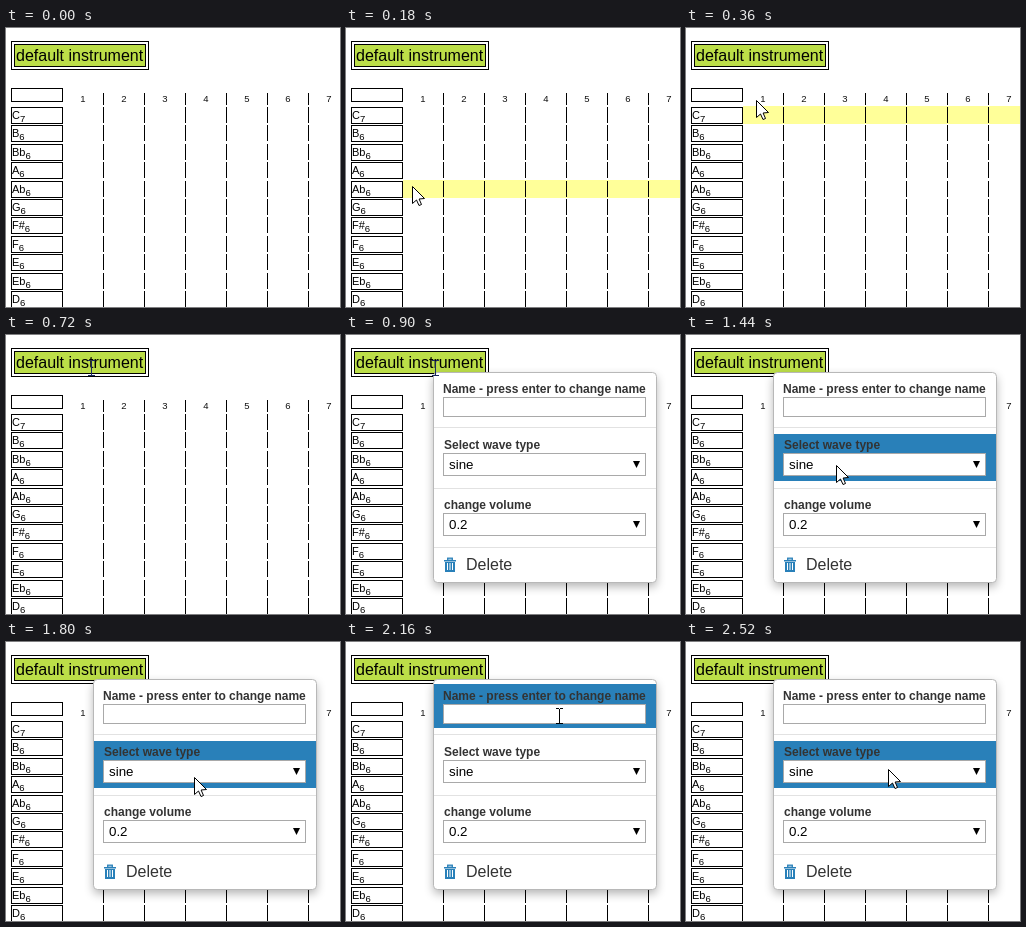
Write an HTML page with a canvas that moves like this. It is 334x279 px and loops after 2.7 s.

```html
<!DOCTYPE html>
<html lang="en">
<head>
<meta charset="utf-8">
<title>Instrument menu</title>
<style>
html, body { margin: 0; width: 100%; height: 100%; overflow: hidden; background: #fff; }
canvas { display: block; }
</style>
</head>
<body>
<canvas id="stage" width="334" height="279"></canvas>
<script>
const ctx = document.getElementById('stage').getContext('2d');
const FONT = '"Liberation Sans", Arial, sans-serif';
const BLUE = '#2980b9';
const STEP = 180;
const PITCH = 18.4;
const NOTES = ['C7', 'B6', 'Bb6', 'A6', 'Ab6', 'G6', 'F#6', 'F6', 'E6', 'Eb6', 'D6'];
const SECTIONS = { name: [42, 44], wave: [99, 47], volume: [160, 46] };

// One pose per step: pointer shape and place, hovered note row, open menu, hovered section
const POSES = [
  {},
  { arrow: [66, 158], row: 4 },
  { arrow: [70, 72], row: 0 },
  { beam: [79, 31] },
  { beam: [85, 33] },
  { beam: [89, 33], menu: true },
  { beam: [108, 70], menu: true, hover: 'name' },
  { beam: [130, 70], menu: true, hover: 'name' },
  { arrow: [150, 130], menu: true, hover: 'wave' },
  { arrow: [172, 203], menu: true, hover: 'volume' },
  { arrow: [188, 135], menu: true, hover: 'wave' },
  { beam: [203, 72], menu: true, hover: 'name' },
  { beam: [213, 74], menu: true, hover: 'name' },
  { arrow: [208, 116], menu: true, hover: 'wave' },
  { arrow: [202, 127], menu: true, hover: 'wave' }
];

function fill(color, x, y, w, h) {
  ctx.fillStyle = color;
  ctx.fillRect(x, y, w, h);
}

function frame(color, x, y, w, h) {
  ctx.strokeStyle = color;
  ctx.lineWidth = 1;
  ctx.strokeRect(x + .5, y + .5, w - 1, h - 1);
}

function text(str, x, y, size, color = '#000', weight = '', align = 'left') {
  ctx.font = `${weight} ${size}px ${FONT}`;
  ctx.textAlign = align;
  ctx.fillStyle = color;
  ctx.fillText(str, x, y);
}

function polygon(color, points) {
  ctx.beginPath();
  points.forEach(([x, y]) => ctx.lineTo(x, y));
  ctx.closePath();
  ctx.fillStyle = color;
  ctx.fill();
}

function drawGrid(row) {
  frame('#000', 5, 13, 138, 29);
  fill('#bcde48', 8, 16, 132, 23);
  frame('#000', 8, 16, 132, 23);
  text('default instrument', 10, 33, 16);

  frame('#000', 5, 60, 52, 14);
  if (row !== undefined) fill('#ffff99', 57, Math.round(78 + row * PITCH), 277, 18);
  for (let i = 0; i < 7; i++) {
    const x = 97 + i * 41;
    text(i + 1, x - 20, 74, 9.5, '#111', '', 'center');
    fill('#000', x, 65, 1, 12);
    NOTES.forEach((_, n) => fill('#000', x, Math.round(79 + n * PITCH), 1, 16));
  }
  NOTES.forEach((note, n) => {
    const y = Math.round(79 + n * PITCH);
    frame('#000', 5, y, 52, 17);
    const pitch = note.slice(0, -1);
    text(pitch, 6, y + 12, 11);
    text(note.slice(-1), 6 + ctx.measureText(pitch).width, y + 15, 9.5);
  });
}

function field(y, h, value) {
  fill('#fff', 97, y, 203, h);
  frame('#a9a9a9', 97, y, 203, h);
  if (!value) return;
  text(value, 103, y + 16, 13.33);
  polygon('#000', [[287, y + 8], [294, y + 8], [290.5, y + 15]]);
}

function drawTrash() {
  fill(BLUE, 98, 225, 12, 1.5);
  ctx.strokeStyle = BLUE;
  ctx.lineWidth = 1.3;
  ctx.strokeRect(101.7, 223.2, 4.6, 2);
  fill(BLUE, 99, 227, 10, 10);
  for (const x of [101, 103.5, 106]) fill('#fff', x, 228, 1, 7);
}

function drawMenu(hover) {
  ctx.save();
  ctx.shadowColor = 'rgba(0,0,0,.3)';
  ctx.shadowBlur = 10;
  ctx.shadowOffsetY = 4;
  ctx.beginPath();
  ctx.roundRect(87.5, 37.5, 223, 210, 4);
  ctx.fillStyle = '#fff';
  ctx.fill();
  ctx.restore();
  ctx.strokeStyle = '#b8b8b8';
  ctx.lineWidth = 1;
  ctx.stroke();

  for (const y of [92, 153, 212]) fill('#e2e2e2', 88, y, 222, 1);
  if (hover) {
    const [y, h] = SECTIONS[hover];
    fill(BLUE, 88, y, 222, h);
  }
  text('Name - press enter to change name', 97, 58, 12, '#333', 'bold');
  field(62, 20);
  text('Select wave type', 98, 114, 12, '#333', 'bold');
  field(118, 23, 'sine');
  text('change volume', 98, 174, 12, '#333', 'bold');
  field(178, 23, '0.2');
  drawTrash();
  text('Delete', 120, 235, 16, '#333');
}

function drawArrow(x, y) {
  const shape = [[0, 0], [0, 17], [4, 13.5], [6.5, 19], [9, 18], [6.6, 12.5], [12, 12]];
  polygon('#fff', shape.map(([a, b]) => [x + a + .5, y + b + .5]));
  ctx.strokeStyle = '#000';
  ctx.lineWidth = 1;
  ctx.stroke();
}

function drawBeam(x, y) {
  const color = y < 40 ? '#1c2a60' : '#000';
  fill(color, x, y - 7, 1, 15);
  for (const end of [y - 8, y + 7]) {
    fill(color, x - 3, end, 3, 1);
    fill(color, x + 1, end, 3, 1);
  }
}

function draw(now) {
  const pose = POSES[Math.floor(now / STEP) % POSES.length];
  fill('#fff', 0, 0, 334, 279);
  drawGrid(pose.row);
  if (pose.menu) drawMenu(pose.hover);
  if (pose.arrow) drawArrow(...pose.arrow);
  if (pose.beam) drawBeam(...pose.beam);
}

const start = performance.now();
function tick() {
  draw(performance.now() - start);
  requestAnimationFrame(tick);
}
tick();
</script>
</body>
</html>
```
